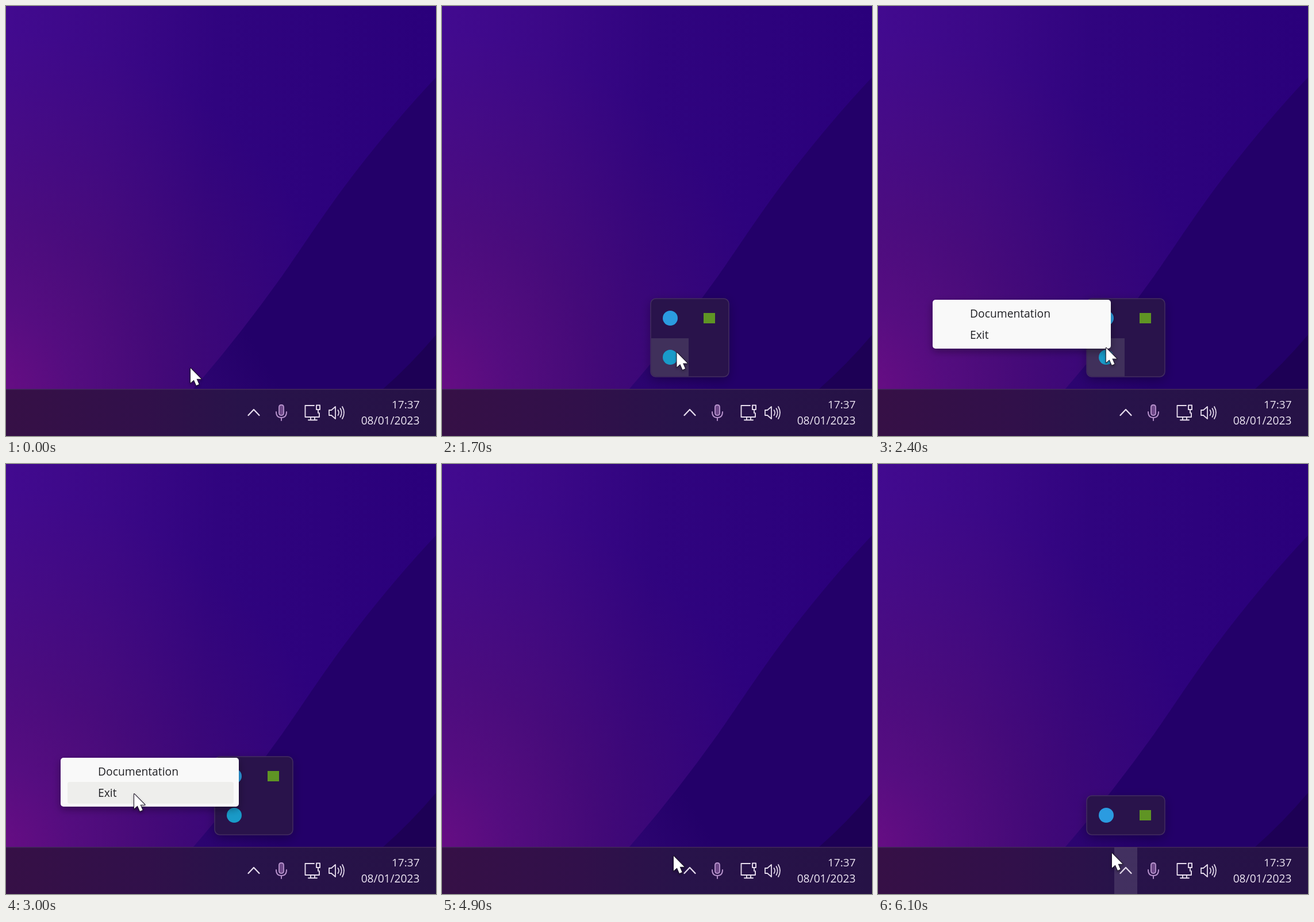
An HTML page with a canvas that plays this animation: 748x748 px, repeating every 6200 ms.

```html
<!DOCTYPE html>
<html lang="en">
<head>
<meta charset="utf-8">
<title>Tray menu</title>
<style>
html, body { margin: 0; width: 100%; height: 100%; overflow: hidden; background: #30047f; }
canvas { display: block; width: 748px; height: 748px; }
</style>
</head>
<body>
<canvas id="stage" width="748" height="748"></canvas>
<script>
const SIZE = 748, LOOP = 6200, STEP = 100, BAR = 667;
const FONT = '"Open Sans", "Noto Sans", sans-serif';
const ctx = document.getElementById('stage').getContext('2d');

// time, x, y of the pointer tip
const POINTER = [
  [0, 321, 630], [500, 434, 717], [1100, 434, 717], [1800, 407, 596],
  [2300, 407, 596], [3000, 223, 574], [3200, 175, 558], [4500, 175, 558],
  [4900, 403, 682], [5000, 421, 702], [5300, 421, 702], [5800, 409, 681], [6100, 407, 677]
];

const within = (t, from, to) => t >= from && t < to;
const mix = (a, b, k) => a + (b - a) * k;

function pointerAt(t) {
  const i = POINTER.findIndex(key => key[0] > t);
  if (i < 0) return POINTER[POINTER.length - 1].slice(1);
  const [t0, x0, y0] = POINTER[i - 1], [t1, x1, y1] = POINTER[i];
  const k = (t - t0) / (t1 - t0), e = k * k * (3 - 2 * k);
  return [mix(x0, x1, e), mix(y0, y1, e)];
}

function gradient(g, stops) {
  stops.forEach(([at, color]) => g.addColorStop(at, color));
  return g;
}

function box(x, y, w, h, r, color) {
  ctx.beginPath();
  ctx.roundRect(x, y, w, h, r);
  ctx.fillStyle = color;
  ctx.fill();
}

function disc(x, y, r, color) {
  ctx.beginPath();
  ctx.arc(x, y, r, 0, 7);
  ctx.fillStyle = color;
  ctx.fill();
}

function shape(d, color) {
  ctx.fillStyle = color;
  ctx.fill(new Path2D(d));
}

function line(d, color, width) {
  ctx.strokeStyle = color;
  ctx.lineWidth = width;
  ctx.stroke(new Path2D(d));
}

function label(text, x, y, size, color, align = 'left', weight = 400) {
  ctx.font = `${weight} ${size}px ${FONT}`;
  ctx.textAlign = align;
  ctx.fillStyle = color;
  ctx.fillText(text, x, y);
}

function shadow(alpha, blur, dy) {
  ctx.shadowColor = `rgba(0,0,0,${alpha})`;
  ctx.shadowBlur = blur;
  ctx.shadowOffsetY = dy;
}

function wallpaper() {
  ctx.fillStyle = gradient(ctx.createLinearGradient(0, 0, SIZE, 60),
    [[0, '#420a8f'], [0.25, '#3b0887'], [0.5, '#30047f'], [1, '#2a007b']]);
  ctx.fillRect(0, 0, SIZE, SIZE);
  ctx.fillStyle = gradient(ctx.createRadialGradient(-40, 680, 0, -40, 680, 640),
    [[0, 'rgba(116,14,132,.85)'], [0.25, 'rgba(104,16,120,.55)'],
     [0.5, 'rgba(98,18,100,.32)'], [1, 'rgba(90,20,100,0)']]);
  ctx.fillRect(0, 0, SIZE, SIZE);
  shape('M748 124Q680 196 610 286C550 364 510 428 480 470Q410 568 338 652L325 667H748Z',
    gradient(ctx.createLinearGradient(340, 660, 440, 600), [[0, '#2c0470'], [1, '#230069']]));
  shape('M748 572Q704 624 655 667H748Z', '#1d0055');
}

function speaker(color) {
  line('M562 703H566L573 697V718L566 712H562Z', color, 1.8);
  line('M577.5 703Q580.5 707.5 577.5 712M581.5 700Q586 707.5 581.5 715M585 697Q591 707.5 585 718', color, 1.8);
}

function taskbar(hover) {
  ctx.fillStyle = gradient(ctx.createLinearGradient(0, 0, SIZE, 0),
    [[0, '#361046'], [0.32, '#31104a'], [0.55, '#28134a'], [1, '#261246']]);
  ctx.fillRect(0, BAR, SIZE, SIZE - BAR);
  ctx.fillStyle = '#42285c';
  ctx.fillRect(0, BAR - 1, SIZE, 1.5);
  if (hover) {
    ctx.fillStyle = 'rgba(255,255,255,.12)';
    ctx.fillRect(411, BAR, 40, SIZE - BAR);
  }
  const ink = '#e6dced', mauve = '#b893cd';
  line('M421.5 712L431 702L440.5 712', ink, 2.3);
  box(474.5, 694, 8.5, 18, 4.2, '#6d4788');
  line('M475 698Q475 694 479 694Q483 694 483 698V708Q483 712 479 712Q475 712 475 708Z', mauve, 1.8);
  line('M470 706Q470 716 479 716Q488 716 488 706M479 716V721', mauve, 1.9);
  line('M536 695H520.5V715H545V708M530 715V720M537 715V720M526 720.3H541', ink, 1.9);
  line('M540 694.5H546V702H540ZM543 702V708', ink, 1.9);
  speaker(ink);
  label('17:37', 719.5, 700, 19, '#ece4f2', 'right', 500);
  label('08/01/2023', 719.5, 727.5, 19.2, '#ece4f2', 'right', 500);
}

function trayPanel(top, hasApp, appHover) {
  ctx.save();
  shadow(0.3, 18, 5);
  box(363, top, 136, 645 - top, 9, '#29134b');
  ctx.restore();
  if (appHover) box(364, 578, 65, 66, [0, 0, 0, 8], '#40305b');
  ctx.beginPath();
  ctx.roundRect(363, top, 136, 645 - top, 9);
  ctx.strokeStyle = '#432e60';
  ctx.lineWidth = 1.5;
  ctx.stroke();
  disc(397, top + 34, 13, '#2b9be0');
  box(455, top + 25, 20, 18, 0, '#5f9424');
  if (hasApp) disc(397, 611, 13, '#199bc9');
}

function drawTray(t) {
  const first = within(t, 600, 3800);
  if (!first && t < 5300) return;
  const opening = t === 600 || t === 5300;
  ctx.save();
  if (opening) {
    ctx.globalAlpha = 0.7;
    ctx.translate(0, 14);
  }
  trayPanel(first ? 509 : 577, first, within(t, 1700, 2500));
  ctx.restore();
}

function drawMenu(t, x, y) {
  const ink = '#202024';
  ctx.save();
  if (within(t, 2200, 3800)) {
    ctx.globalAlpha = t < 2300 ? 0.45 : 1;
    ctx.save();
    shadow(0.35, 14, 5);
    box(95, 511, 310, 85, 5, '#f9f9f9');
    ctx.restore();
    if (x < 396 && y < 591 && y > 553) box(107, 553, 289, 38, 4, '#eeeeec');
    if (t < 2300) ctx.globalAlpha = 0.8;
    label('Documentation', 160, 541.5, 19.3, t < 2300 ? '#28084e' : ink);
    label('Exit', 160, 579, 19.3, t < 2300 ? '#28084e' : ink);
  } else if (within(t, 3800, 4000)) {
    ctx.globalAlpha = t < 3900 ? 0.58 : 0.22;
    box(100, 553, 300, 38, 0, '#eeeeee');
    label('Exit', 160, 579, 19.3, ink);
  }
  ctx.restore();
}

function drawPointer(x, y) {
  ctx.save();
  ctx.translate(x, y);
  shadow(0.4, 4, 2);
  const arrow = 'M0 0V25.5L5.8 20.4L10 30L14.6 28L10.6 18.8H18.5Z';
  line(arrow, '#1c1428', 2);
  shadow(0, 0, 0);
  shape(arrow, '#ffffff');
  ctx.restore();
}

function frame(now) {
  const t = Math.floor((now % LOOP) / STEP) * STEP;
  const [x, y] = pointerAt(t);
  wallpaper();
  drawTray(t);
  taskbar(within(t, 400, 1300) || t >= 5000);
  drawMenu(t, x, y);
  drawPointer(x, y);
  requestAnimationFrame(tick);
}

let start;
function tick(now) {
  start ??= now;
  frame(now - start);
}
ctx.lineJoin = ctx.lineCap = 'round';
requestAnimationFrame(tick);
</script>
</body>
</html>
```
